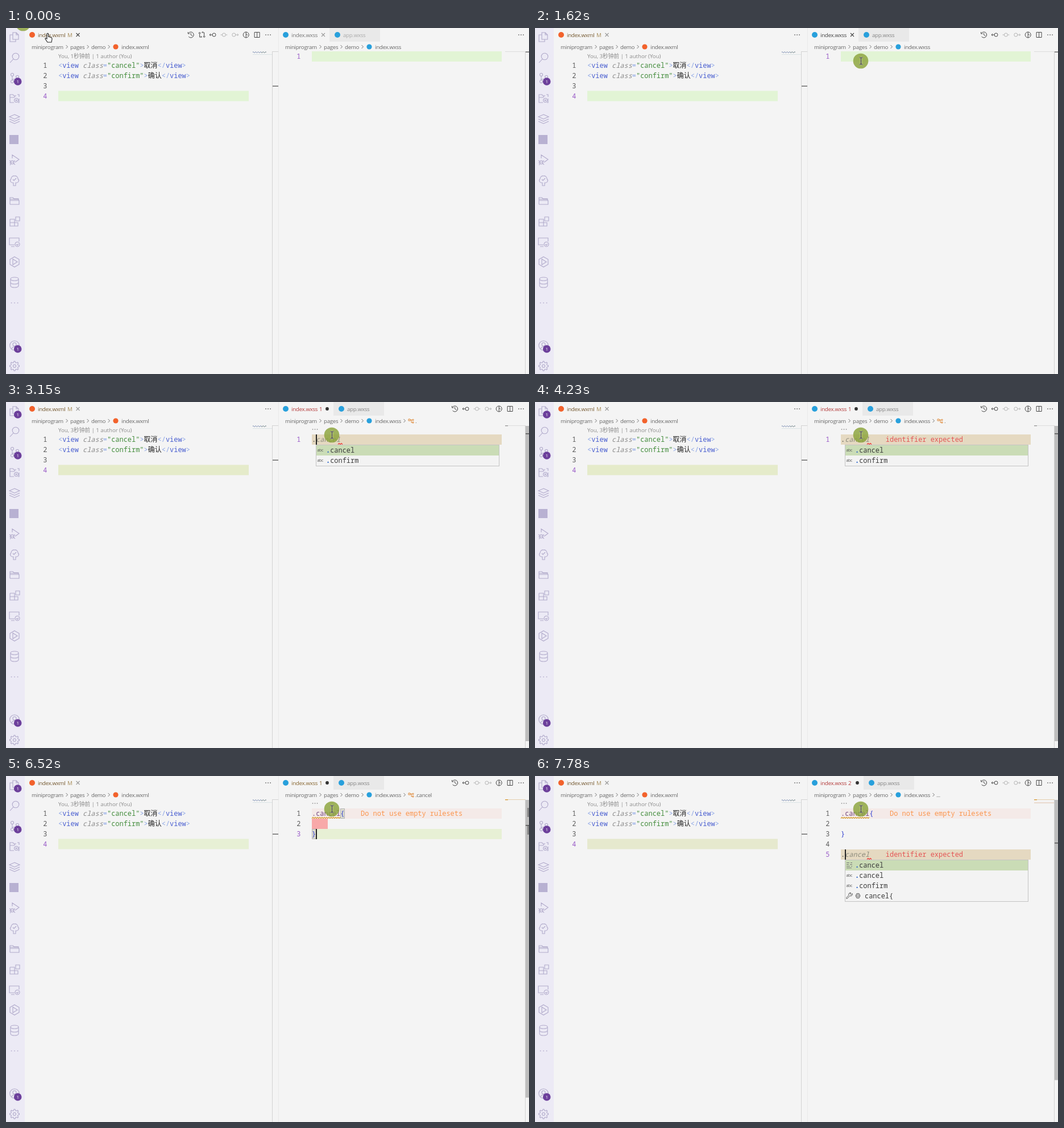
Animation, 920 px wide and 608 px high, one loop 8000 ms. Source, as an HTML page with a canvas:

```html
<!DOCTYPE html>
<html lang="zh">
<head>
<meta charset="utf-8">
<title>Editor class completion</title>
<style>
html, body { margin: 0; width: 100%; height: 100%; overflow: hidden; background: #f4f4f4; }
canvas { display: block; }
</style>
</head>
<body>
<canvas id="stage" width="920" height="608"></canvas>
<script>
const g = document.getElementById('stage').getContext('2d');
const LOOP = 8000, STEP = 90, CHAR = 7.17, ROW = 18;
const UI = '"Open Sans", "Noto Sans CJK SC", "Noto Sans CJK", sans-serif';
const MONO = '"Noto Sans Mono", "Noto Sans CJK SC", "Noto Sans CJK", monospace';
const BG = '#f4f4f4', ORANGE = '#f2622c', BLUE = '#28a0dc', PURPLE = '#9a5cc8', RED = '#e45656';
const SIDE_ICON = '#b0a9ca';

// Times at which the caret toggles between hidden and shown.
const BLINKS = [1980, 2430, 2790, 3240, 3780, 4230, 4410, 4860, 5040, 5440, 5710, 6250, 6430, 7420, 7690];
// Pointer path: time, x, y.
const PATH = [[0, 30, -8], [90, 74, 16], [270, 220, 42], [450, 460, 74], [630, 660, 87], [810, 729, 84],
  [900, 729, 84], [1080, 680, 72], [1260, 605, 60], [1440, 573, 58]];

const ring = (x, y, r) => `M${x + r} ${y}A${r} ${r} 0 1 1 ${x - r} ${y}A${r} ${r} 0 1 1 ${x + r} ${y}`;
const gear = Array.from({ length: 32 }, (_, i) => {
  const a = (i - .5) * Math.PI / 16, r = i % 4 < 2 ? 8.5 : 6.3;
  return (i ? 'L' : 'M') + (r * Math.cos(a)).toFixed(2) + ' ' + (r * Math.sin(a)).toFixed(2);
}).join('') + 'Z';

const SIDEBAR = [
  [16, 'M-3-8H3L7-4V4H-3ZM3-8V-4H7M-3-4H-8V8H2V4'],
  [52, ring(2, -2, 5.8) + 'M-2 2.5L-8 9'],
  [88, ring(-4, -6, 2.5) + ring(-4, 6, 2.5) + ring(5, -2, 2.5) + 'M-4-3.5V3.5M5 .5C5 4-4 0-4 3.5'],
  [124, 'M-1 7H-8V-7H-3L-1-5H3M-8-2H-1L1-4' + ring(3, 3, 3.5) + ring(3, 3, 1) + 'M5-7H8V-3M8 0V7H6'],
  [160, 'M0-8L9-4L0 0L-9-4ZM-9 0L0 4L9 0M-9 4L0 8L9 4'],
  [232, 'M-4-3V-9L8-1L1 4' + ring(-4, 4, 3) + 'M-9 1L-6 3M-9 5H-7M-8 9L-6 6M1 1L-2 3M1 8L-2 6M-7 4H-1'],
  [268, 'M-2 9V4H-4A4 4 0 0 1-6-3A5 5 0 0 1 0-8A5 5 0 0 1 6-3A4 4 0 0 1 4 4H2V9ZM-3-2L-1 0L3-4'],
  [304, 'M-8 6V-6H-3L-1-4H7V-1M-8 6H8V-1H-8M-8-3H7'],
  [340, 'M-8-4H0V8M-8-4V8H6V2H-8M2-8H9V-1H2Z'],
  [376, 'M0 5H-9V-7H8V-1M-6 8H0' + ring(5, 4, 4) + 'M3 4L5 6L7 3'],
  [411, 'M0-9L8-4.5V4.5L0 9L-8 4.5V-4.5ZM-3-5L5 0L-3 5Z'],
  [447, 'M-7-6A7 3 0 0 1 7-6A7 3 0 0 1-7-6V6A7 3 0 0 0 7 6V-6M-7 0A7 3 0 0 0 7 0'],
  [558, ring(0, 0, 8.3) + ring(0, -2, 3) + 'M-5 6C-4 1 4 1 5 6'],
  [594, gear + ring(0, 0, 2.5)]
];
const TOOL = {
  history: 'M-4-3A5 5 0 1 1-4 3M-5-5V-2H-2M0-3V0L3 2',
  compare: ring(-4, -3, 1.3) + ring(4, 3, 1.3) + 'M-4-1V4H0L-2 2M4 1V-4H0L2-6',
  prev: ring(2, 0, 3) + 'M-1 0H-6M-4-2L-6 0L-4 2',
  commit: ring(0, 0, 3) + 'M-6 0H-3M3 0H6',
  next: ring(-2, 0, 3) + 'M1 0H6M4-2L6 0L4 2',
  graph: ring(0, 0, 5) + 'M0-5V5M0-2L3 1',
  split: 'M-4.5-4.5H4.5V4.5H-4.5ZM0-4.5V4.5'
};

function rect(x, y, w, h, color) { g.fillStyle = color; g.fillRect(x, y, w, h); }
function disc(x, y, r, color) { g.fillStyle = color; g.beginPath(); g.arc(x, y, r, 0, 7); g.fill(); }
function icon(d, x, y, color, width = 1, fill) {
  const p = new Path2D(d);
  g.save();
  g.translate(x, y);
  g.lineWidth = width;
  g.strokeStyle = color;
  if (fill) { g.fillStyle = fill; g.fill(p); }
  g.stroke(p);
  g.restore();
}
function text(s, x, y, color, font, spacing = 0, align = 'left') {
  g.font = font;
  g.letterSpacing = spacing + 'px';
  g.textAlign = align;
  g.fillStyle = color;
  g.fillText(s, x, y);
}
const label = (s, x, y, color) => text(s, x, y, color, '9.75px ' + UI, -.32);
const code = (s, x, y, color, style = '') => text(s, x, y, color, style + ' 11.95px ' + MONO);
const lineNumber = (n, right, y, active) =>
  text(n, right, y, active ? PURPLE : '#5c5c5c', '11.95px ' + MONO, 0, 'right');
const dots = (x, y, gap, color) => { for (let i = -1; i < 2; i++) rect(x + i * gap - .7, y - .7, 1.5, 1.5, color); };
const cross = (x, y, color) => icon('M-3-3L3 3M3-3L-3 3', x, y, color, 1.1);
const chevron = (x, y) => icon('M-1.5-3L1.5 0L-1.5 3', x, y, '#777');

function badge(y) {
  disc(20.7, y, 6.8, '#6c3f9b');
  text('1', 20.7, y + 3, '#fff', '8px ' + UI, 0, 'center');
}
function squiggle(x0, x1, y, color) {
  let d = `M${x0} ${y}`;
  for (let x = x0 + 2, i = 0; x <= x1; x += 2, i++) d += `L${x} ${y + (i % 2 ? 0 : -2)}`;
  icon(d, 0, 0, color, 1.1);
}
function breadcrumb(x, file, color) {
  label('miniprogram', x, 37, '#686868');
  label('pages', x + 68, 37, '#686868');
  label('demo', x + 105, 37, '#686868');
  [62, 99, 136].forEach(dx => chevron(x + dx, 33));
  disc(x + 148, 33, 4.6, color);
  label(file, x + 158, 37, '#686868');
}
function toolbar(names, right) {
  names.forEach((name, i) => icon(TOOL[name], right - 19.4 * (names.length - i), 12,
    name === 'commit' || name === 'next' ? '#b5b5b5' : '#484848'));
}

function drawSidebar(dirty) {
  rect(0, 0, 33, 608, '#eceaf5');
  SIDEBAR.forEach(([y, d]) => icon(d, 15, y, SIDE_ICON, 1.1));
  rect(6, 188, 16, 16, '#b8b1d2');
  dots(15, 483, 5.5, SIDE_ICON);
  if (dirty) badge(22);
  badge(94);
  badge(564);
}

function drawMarkup(focused, highlight) {
  disc(46, 12, 5, ORANGE);
  label('index.wxml', 56, 16, '#74582f');
  label('M', 108, 16, '#a58a55');
  cross(126.5, 12, focused ? '#444' : '#999');
  if (focused) toolbar(['history', 'compare', 'prev', 'commit', 'next', 'graph', 'split'], 461);
  dots(461, 12, 4, '#555');
  breadcrumb(45, 'index.wxml', ORANGE);
  text(`You, ${focused ? 1 : 3}秒钟前 | 1 author (You)`, 92, 53, '#8c8c8c', '9.75px ' + UI, -.06);

  rect(92, 110.5, 335, 18, highlight);
  for (let n = 1; n < 5; n++) lineNumber(n, 72.5, 52 + ROW * n, n === 4);
  [['cancel', '取消'], ['confirm', '确认']].forEach(([name, word], i) => {
    let x = 92;
    const put = (s, color, style) => {
      code(s, x, 70 + ROW * i, color, style);
      x += s.length * (s === word ? 12 : CHAR);
    };
    put('<', '#8aa4e6'); put('view', '#4a5fd0'); put(' class', '#8b8b8b', 'italic');
    put('=', '#8aa4e6'); put(`"${name}"`, '#438c3c'); put('>', '#8aa4e6');
    put(word, '#222'); put('</', '#8aa4e6'); put('view', '#4a5fd0'); put('>', '#8aa4e6');
  });

  for (let i = 0; i < 11; i++) rect(434 + i * 2.2, 41.5 + i % 2, 1.6, 1.5, i < 7 ? '#8797b8' : '#74868c');
  rect(434, 46, 34, 1, '#dbe4e6');
  rect(468, 41, 1, 567, '#d3d3d3');
  rect(469, 41, 10, 1, '#d3d3d3');
  rect(469, 101.5, 10, 1.3, '#555');
  rect(479, 0, 1, 608, '#e9e9e9');
}

function drawPopup(y, items) {
  const h = items.length * ROW + 2;
  rect(545, y, 323, h, '#f3f3f3');
  rect(546, y + 1, 322, ROW, '#cadcb6');
  g.strokeStyle = '#c4c4c4';
  g.lineWidth = 1;
  g.strokeRect(545.5, y + .5, 322, h - 1);
  items.forEach(([kind, word], i) => {
    const mid = y + 9.5 + i * ROW;
    if (kind === 'abc') text('abc', 547.5, mid + 2, '#555', '7px ' + UI, -.3);
    if (kind === 'rule') icon('M-5-4H0M2-4H5M-5-1H-1M1-1H5M-5 2H1M3 2H5M-5 5H4', 553, mid, '#777');
    if (kind === 'fix') {
      icon('M-5 5L-4 5L1 0A3 3 0 0 0 5-4L3-2L1-4L3-5A3 3 0 0 0-1-1L-5 3Z', 553, mid, '#555');
      icon('M-2-4H2L4 0L2 4H-2L-4 0Z' + ring(0, 0, 2), 568, mid, '#555');
      code(word, 580, mid + 4.5, '#3c3c3c');
    } else {
      code('.', 563, mid + 4.5, '#2862c8', 'bold');
      code(word, 563 + CHAR, mid + 4.5, '#3c3c3c');
    }
  });
}

function stylesAt(t) {
  if (t < 2790) return { lines: [''], line: 1, col: 0 };
  if (t < 4410) return { lines: ['.'], line: 1, col: 1 };
  if (t < 5040) return { lines: ['.cancel'], line: 1, col: 7 };
  if (t < 5710) return { lines: ['.cancel{}'], line: 1, col: 8 };
  if (t < 6430) return { lines: ['.cancel{', '    ', '}'], line: 2, col: 4 };
  if (t < 6790) return { lines: ['.cancel{', '    ', '}'], line: 3, col: 1 };
  if (t < 6880) return { lines: ['.cancel{', '', '}', ''], line: 4, col: 0 };
  return { lines: ['.cancel{', '', '}', '', t < 7690 ? '' : '.'], line: 5, col: t < 7690 ? 0 : 1 };
}

function drawStyles(t, focused, highlight) {
  const { lines, line, col } = stylesAt(t);
  const dirty = t >= 2790, lens = t >= 3060, marked = t >= 3150;
  const ruled = t >= 5130, second = t >= 7780;
  const failing = (marked && !ruled) || second;
  const top = lens ? 57 : 41, rowY = n => top + (n - 1) * ROW;
  const shift = second ? 9 : marked ? 7 : 0;

  // Tabs and breadcrumb
  rect(569 + shift, 0, 89, 24, '#e9e9e9');
  disc(492, 12, 5, BLUE);
  const tabColor = failing ? '#b43c3c' : marked ? '#86652f' : focused ? '#444' : '#777';
  label('index.wxss', 502, 16, tabColor);
  if (marked) label(second ? '2' : '1', 551, 16, tabColor);
  if (dirty) disc(558 + shift, 12, 2.9, '#333');
  else cross(558, 12, focused ? '#444' : '#999');
  disc(583 + shift, 12, 5, BLUE);
  label('app.wxss', 593 + shift, 16, focused ? '#858585' : '#ababab');
  if (focused) toolbar(['history', 'prev', 'commit', 'next', 'graph', 'split'], 906);
  dots(906, 12, 4, '#555');
  breadcrumb(491, 'index.wxss', BLUE);
  if (lens) {
    chevron(701, 33);
    if (t >= 6790) label('...', 706, 37, '#686868');
    else {
      icon('M-4-3H-1V0H-4ZM-1-1.5H3M1-1.5V3H3' + ring(4, -1.5, 1.2) + ring(4, 3, 1.2), 712, 33, '#df8a3a');
      label(t < 4770 ? '.' : '.cancel', 720, 37, '#686868');
    }
    dots(543.5, 48, 4, '#888');
  }

  // Row backgrounds
  if (ruled) rect(538, top, 334, ROW, '#f4eae8');
  const rowColor = failing ? '#e5d9c1' : ruled && line === 1 ? '#e8e3cc' : highlight;
  rect(538, rowY(line), 334, ROW, rowColor);
  if (line === 3) rect(538, rowY(2), 28, ROW, '#f8a9a9');
  if (ruled && t < 6790) {
    const close = lines.length > 1 ? [538, rowY(3)] : [538 + 8 * CHAR, top];
    [[538 + 7 * CHAR, top], close].forEach(([x, y]) => {
      rect(x, y, CHAR, ROW, '#dcdccf');
      g.strokeStyle = '#b5b5b5';
      g.lineWidth = 1;
      g.strokeRect(Math.round(x) + .5, y + .5, 7, ROW - 1);
    });
  }

  // Code
  lines.forEach((s, i) => {
    const y = rowY(i + 1) + 13;
    lineNumber(i + 1, 518.5, y, i + 1 === line);
    const word = s.replace(/[{}]/g, '');
    code(word, 538, y, word === '.' ? '#444' : '#76497f');
    code(s.slice(word.length), 538 + word.length * CHAR, y, '#3240d0');
  });
  const suggesting = (t >= 2880 && t < 4410) || second;
  const after = (n, s, color) => code(s, 538 + n * CHAR, rowY(second && color === RED ? 5 : 1) + 13, color);
  if (suggesting) {
    code('cancel', 538 + CHAR, rowY(line) + 13, '#8d8c7d', 'italic');
    squiggle(584, 592, rowY(line) + ROW - .5, '#e33');
  }
  if (t >= 4410 && !ruled) squiggle(586, 592, top + ROW - .5, '#e33');
  if (ruled) {
    squiggle(538, 588, top + ROW - .5, '#d59a28');
    after(lines.length > 1 ? 12 : 13, 'Do not use empty rulesets', '#fb954d');
  }
  if ((t >= 3240 && t < 4770) || second) after(11, 'identifier expected', RED);
  if (t >= 4770 && !ruled) after(t < 5040 ? 11 : 13, '{ expected', RED);

  // Minimap and overview ruler
  rect(878, 41, 35, 1, ruled ? '#e4cfae' : '#dcdcdc');
  if (dirty) rect(878, 41, 5, 1.4, ruled ? '#d79a35' : '#9a9a9a');
  if (second) rect(878, 46.5, 35, 1.2, '#e3c9b6');
  rect(913, 41, 1, 567, '#d3d3d3');
  if (lens) {
    const overview = n => 55 + (n - 1) * 15.5;
    rect(914, 42, 6, 554 - (lines.length - 1) * 15.4, '#bdbdbd');
    if (ruled && t < 6790) [1, 3].forEach(n => n <= lines.length && rect(917, overview(n) + 1, 3, 16, '#858585'));
    rect(914, overview(line), 6, 1.5, '#555');
  } else rect(914, 41.5, 6, 1.3, '#555');

  if (suggesting) {
    const names = [['abc', 'cancel'], ['abc', 'confirm']];
    drawPopup(rowY(line) + ROW, second ? [['rule', 'cancel'], ...names, ['fix', 'cancel{']] : names);
  }
  if (BLINKS.filter(b => t >= b).length % 2)
    rect(Math.floor(538 + col * CHAR) - (col === 4 ? 1 : 0), rowY(line), col ? 2 : 1, ROW, '#252525');
}

function pointAt(t) {
  const time = Math.floor(t / STEP) * STEP;
  const i = PATH.findIndex(p => p[0] > time);
  if (i < 0) return PATH[PATH.length - 1].slice(1);
  const [t0, x0, y0] = PATH[i - 1], [t1, x1, y1] = PATH[i], k = (time - t0) / (t1 - t0);
  return [x0 + (x1 - x0) * k, y0 + (y1 - y0) * k];
}

function drawPointer(t) {
  disc(...pointAt(t), 13.3, 'rgba(139,164,59,.82)');
  const [x, y] = pointAt(t + STEP);
  if (y < 24) {
    icon('M-3-7Q-1.5-8.5-.5-7V-2L4-.5Q6 0 6 2L5 8H-2L-6 2Q-6 0-4 1L-3 2Z', x + 1, y + 1, '#222', 1.1, '#fff');
  } else {
    const beam = 'M-3-6H-1L0-5L1-6H3M0-5V5M-3 6H-1L0 5L1 6H3';
    icon(beam, x + .5, y, '#e8ecd8', 2.2);
    icon(beam, x + .5, y, '#222', 1.1);
  }
}

function draw(t) {
  const leftFocused = t < 1350;
  const highlight = t < 3150 ? '#e2f4d5' : t < 5710 ? '#e5ebca' : t < 7780 ? '#e7f0d5' : '#e6e9ce';
  rect(0, 0, 920, 608, BG);
  drawSidebar(t >= 2790);
  drawMarkup(leftFocused, highlight);
  drawStyles(t, !leftFocused, highlight);
  drawPointer(t);
}

const start = performance.now();
(function frame() {
  draw((performance.now() - start) % LOOP);
  requestAnimationFrame(frame);
})();
</script>
</body>
</html>
```
